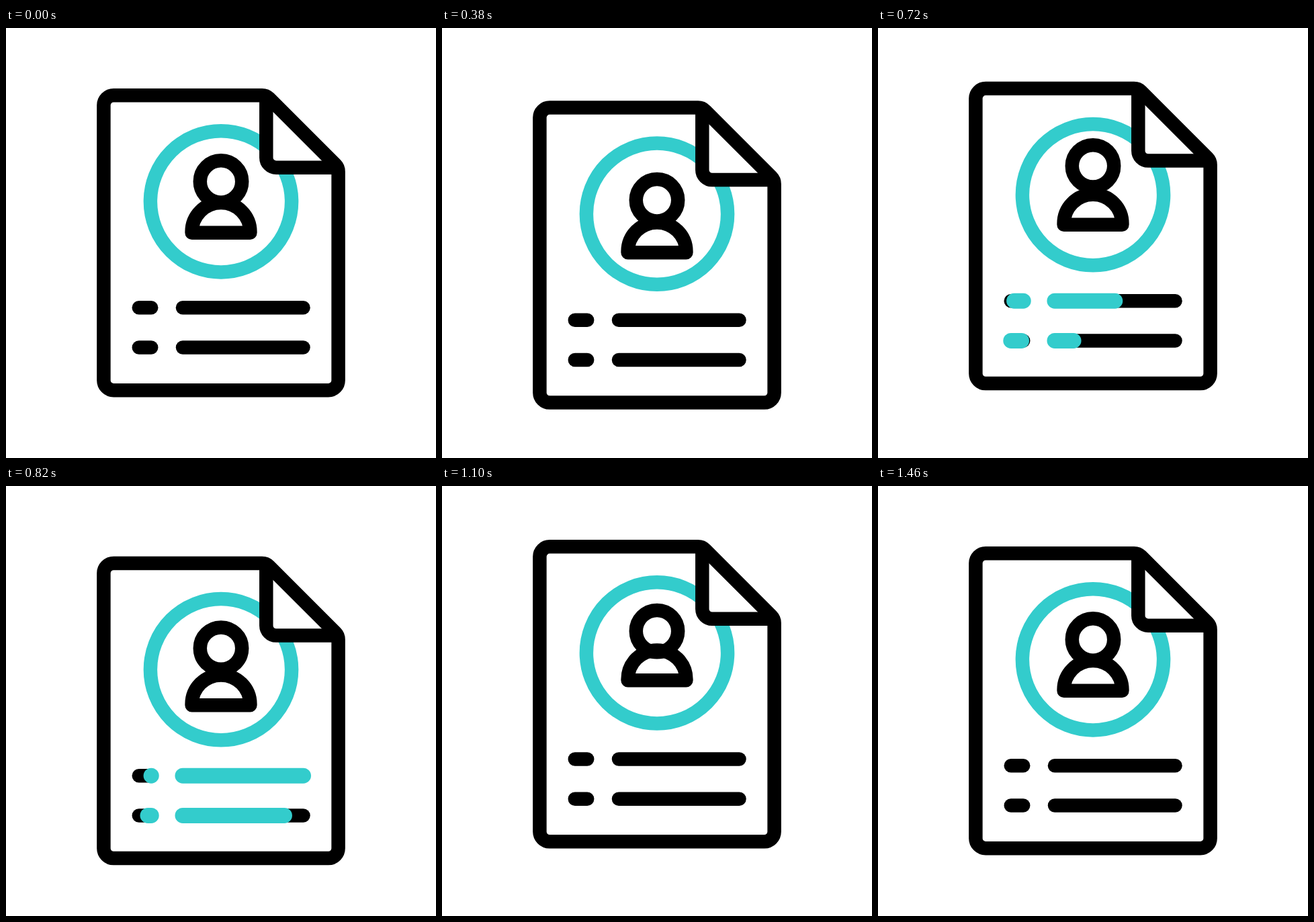
Write an HTML page that moves like this. It is 640 px wide and 640 px high and loops after 1560 ms.

```html
<!DOCTYPE html>
<html lang="en">
<head>
<meta charset="utf-8">
<title>Profile document</title>
<style>
  html, body { margin: 0; width: 100%; height: 100%; overflow: hidden; background: #fff; }
  svg { display: block; width: 100%; height: 100%; }
</style>
</head>
<body>
<svg viewBox="0 0 640 640" fill="none" stroke="#000" stroke-width="20.5" stroke-linejoin="round">
  <g id="page">
    <circle cx="320" cy="258.3" r="105.1" stroke="#33cccc"/>
    <path fill="#fff" stroke="none" d="M387.3 102V207.7H490Z"/>
    <path d="M381 100.2H160.2A14.8 14.8 0 0 0 145.4 115V524.4A14.8 14.8 0 0 0 160.2 539.2H479.8A14.8 14.8 0 0 0 494.6 524.4V213.8A14.8 14.8 0 0 0 490.3 203.3L391.6 104.6A14.8 14.8 0 0 0 381 100.2Z"/>
    <path d="M387.3 102V192.9A14.8 14.8 0 0 0 402.1 207.7H490"/>
    <path id="body" d="M276.6 304.8V303.3A43.4 43.4 0 0 1 363.4 303.3V304.8Z"/>
    <circle id="head" cx="320" cy="228.5" r="31.2"/>
    <g id="lines" stroke-linecap="round"></g>
  </g>
</svg>
<script>
const STEP = 20, LOOP = 1560;
const $ = id => document.getElementById(id);
const clamp = u => Math.min(1, Math.max(0, u));
const ease = u => u * u * (3 - 2 * u);
const ramp = (t, start, length) => ease(clamp((t - start) / length));

// Vertical bounces: [time in steps, offset in px]
const bounces = {
  page: [[10, 0], [19.5, 18.5], [29, -37.2], [43.3, 18.7], [54, -10], [71, 0]],
  body: [[10, 0], [19.5, 11.2], [31, -7], [45, 10], [56, -6], [73, 0]],
  head: [[10, 0], [20.5, 10], [36, -13], [46, 9.5], [59, -6], [73, 0]]
};

// Each highlight draws on from `on`, then off from `off`
const lines = [
  { y: 416.3, from: 197.8, to: 216.2, on: 27.4, off: 33.3, length: 8 },
  { y: 475.6, from: 197.8, to: 216.2, on: 29.9, off: 35.8, length: 8 },
  { y: 416.3, from: 263, to: 442.5, on: 31, off: 41.6, length: 10 },
  { y: 475.6, from: 263, to: 442.5, on: 33.5, off: 43.9, length: 10 }
];

function addLine({ y, from, to }, attrs = {}) {
  const el = document.createElementNS("http://www.w3.org/2000/svg", "line");
  const all = { x1: from, x2: to, y1: y, y2: y, ...attrs };
  for (const name in all) el.setAttribute(name, all[name]);
  return $("lines").appendChild(el);
}

for (const line of lines) {
  addLine(line);
  line.glow = addLine(line, { stroke: "#33cccc", "stroke-width": 23 });
}

function offsetAt(keys, t) {
  let y = keys[0][1];
  for (let i = 1; i < keys.length; i++) {
    const [t0, y0] = keys[i - 1], [t1, y1] = keys[i];
    y += (y1 - y0) * ramp(t, t0, t1 - t0);
  }
  return y;
}

function draw(t) {
  for (const id in bounces) {
    $(id).setAttribute("transform", `translate(0 ${offsetAt(bounces[id], t).toFixed(2)})`);
  }
  for (const { glow, from, to, on, off, length } of lines) {
    const head = ramp(t, on, length), tail = ramp(t, off, length);
    glow.setAttribute("x1", from + (to - from) * tail);
    glow.setAttribute("x2", from + (to - from) * head);
    glow.setAttribute("visibility", head > tail ? "visible" : "hidden");
  }
}

function tick() {
  draw(Math.floor(performance.now() % LOOP / STEP));
  requestAnimationFrame(tick);
}
tick();
</script>
</body>
</html>
```
